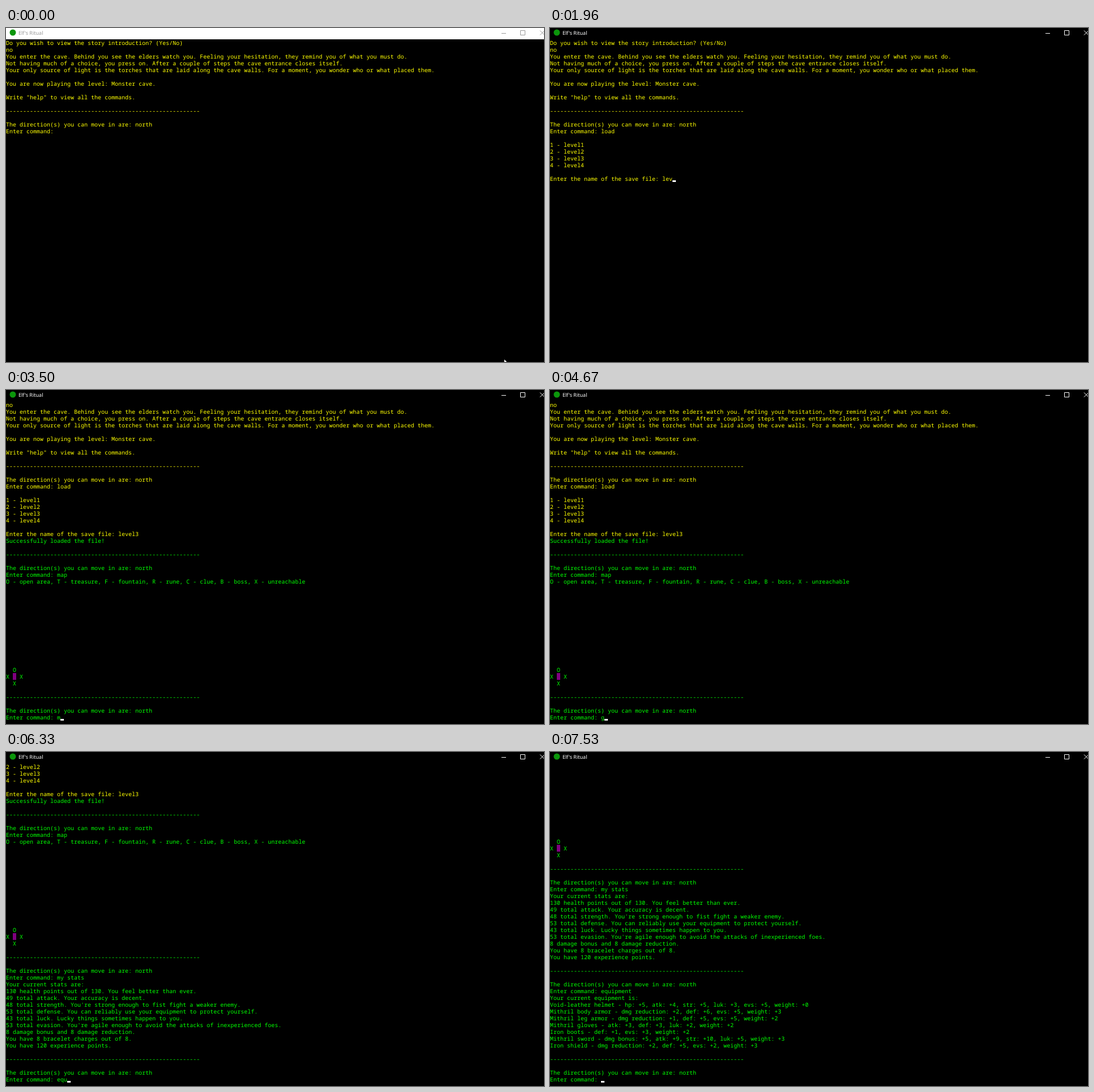
An HTML page that plays this animation: 949x590 px, repeating every 8000 ms.

```html
<!DOCTYPE html>
<html lang="en">
<head>
<meta charset="utf-8">
<title>Elf's Ritual</title>
<style>
  html, body { margin: 0; width: 100%; height: 100%; overflow: hidden; background: #000; }
  svg { display: block; }
  text { white-space: pre; text-rendering: geometricPrecision; }
  #rows { font: 10px "Noto Sans Mono", "DejaVu Sans Mono", monospace; }
  #title { font: 9px "Noto Sans", "Open Sans", sans-serif; }
</style>
</head>
<body>
<svg width="949" height="590" viewBox="0 0 949 590">
  <rect width="949" height="590"/>
  <rect id="bar" width="949" height="20"/>
  <circle cx="12" cy="8" r="5.5" fill="#0b960b"/>
  <text id="title" x="22" y="12">Elf's Ritual</text>
  <path id="buttons" d="M874 9.5h8M907.5 4.5h8v8h-8zM942 4.5l8 8M942 12.5l8 -8" fill="none"/>
  <rect id="marker" x="12" width="6" height="12" fill="#800080"/>
  <g id="rows"></g>
  <rect id="caret" width="6" height="3" fill="#fff"/>
  <path id="pointer" d="M879 585.5v8l6 -2z" fill="#fff"/>
</svg>
<script>
const LOOP = 8000, CELL = 6, ROW = 12, TOP = 20, ROWS = 47;
const YELLOW_LINES = 21, MARKER_LINE = 41;
const el = id => document.getElementById(id);

const prompt = command => ['', '-'.repeat(57), '',
  'The direction(s) you can move in are: north', 'Enter command: ' + command];

const lines = [
  'Do you wish to view the story introduction? (Yes/No)',
  'no',
  'You enter the cave. Behind you see the elders watch you. Feeling your hesitation, they remind you of what you must do.',
  'Not having much of a choice, you press on. After a couple of steps the cave entrance closes itself.',
  'Your only source of light is the torches that are laid along the cave walls. For a moment, you wonder who or what placed them.',
  '',
  'You are now playing the level: Monster cave.',
  '',
  'Write "help" to view all the commands.',
  ...prompt('load'),
  '',
  ...[1, 2, 3, 4].map(n => `${n} - level${n}`),
  '',
  'Enter the name of the save file: level3',
  'Successfully loaded the file!',
  ...prompt('map'),
  'O - open area, T - treasure, F - fountain, R - rune, C - clue, B - boss, X - unreachable',
  ...Array(12).fill(''),
  '  O', 'X   X', '  X',
  ...prompt('my stats'),
  'Your current stats are:',
  '130 health points out of 130. You feel better than ever.',
  '49 total attack. Your accuracy is decent.',
  "48 total strength. You're strong enough to fist fight a weaker enemy.",
  '53 total defense. You can reliably use your equipment to protect yourself.',
  '43 total luck. Lucky things sometimes happen to you.',
  "53 total evasion. You're agile enough to avoid the attacks of inexperienced foes.",
  '8 damage bonus and 8 damage reduction.',
  'You have 8 bracelet charges out of 8.',
  'You have 120 experience points.',
  ...prompt('equipment'),
  'Your current equipment is:',
  'Void-leather helmet - hp: +5, atk: +4, str: +5, luk: +3, evs: +5, weight: +0',
  'Mithril body armor - dmg reduction: +2, def: +6, evs: +5, weight: +3',
  'Mithril leg armor - dmg reduction: +1, def: +5, evs: +5, weight: +2',
  'Mithril gloves - atk: +3, def: +3, luk: +2, weight: +2',
  'Iron boots - def: +1, evs: +3, weight: +2',
  'Mithril sword - dmg bonus: +5, atk: +9, str: +10, luk: +5, weight: +3',
  'Iron shield - dmg reduction: +2, def: +5, evs: +2, weight: +3',
  ...prompt('')
];

// [time, last printed line, typed input (null while printing), caret hidden]
const steps = [
  [0, 13, '', true], [100, 13, ''], [630, 13, '', true],
  [1040, 13, 'l'], [1140, 13, 'lo'], [1200, 13, 'loa'], [1260, 13, 'load'],
  [1390, 18, null], [1450, 20, ''],
  [1780, 20, 'l'], [1850, 20, 'le'], [1920, 20, 'lev'], [1990, 20, 'leve'], [2060, 20, 'level'],
  [2210, 20, 'level3', true],
  [2390, 26, ''], [2940, 26, 'm'], [3090, 26, 'ma'], [3140, 26, 'map'],
  [3220, 47, ''], [3500, 47, 'm'], [3780, 47, 'm', true],
  [4010, 47, 'my'], [4110, 47, 'my '], [4290, 47, 'my ', true], [4520, 47, 'my'],
  [4670, 47, 'g'], [4750, 47, ''], [4880, 47, 'm'], [4960, 47, 'my'], [5050, 47, 'my '],
  [5150, 47, 'my s'], [5250, 47, 'my st'], [5350, 47, 'my sta'], [5440, 47, 'my stat'],
  [5490, 47, 'my stats'],
  [5670, 62, ''], [6150, 62, 'e'], [6240, 62, 'eq'], [6330, 62, 'equ'], [6410, 62, 'equi'],
  [6660, 62, 'equip'], [6840, 62, 'equipm'], [6940, 62, 'equipme'],
  [7050, 62, 'equipmen'], [7150, 62, 'equipment'],
  [7430, 70, null], [7480, 75, '', true], [7530, 75, '']
];

const rows = Array.from({ length: ROWS }, (_, i) => {
  const row = document.createElementNS('http://www.w3.org/2000/svg', 'text');
  row.setAttribute('y', TOP + i * ROW + 10);
  return el('rows').appendChild(row);
});

const grey = v => `rgb(${v},${v},${v})`;
const show = (node, on) => node.setAttribute('visibility', on ? 'visible' : 'hidden');

function drawTitleBar(t) {
  const focus = t < 30 ? 0 : Math.min(1, (Math.floor((t - 30) / 54) + 1) / 6);
  const ink = grey(Math.round(153 + 102 * focus));
  el('bar').setAttribute('fill', grey(Math.round(255 * (1 - focus))));
  el('title').setAttribute('fill', ink);
  el('buttons').setAttribute('stroke', ink);
  show(el('pointer'), t < 30);
}

let shown;
function drawConsole(step) {
  if (step === shown) return;
  shown = step;
  const [, last, typed, hidden] = step;
  const scroll = Math.max(0, last - ROWS + 1);
  const typing = typed !== null;
  const input = typing ? lines[last].slice(0, lines[last].lastIndexOf(': ') + 2) + typed : lines[last];

  rows.forEach((row, i) => {
    const n = i + scroll;
    row.textContent = n < last ? lines[n] : n === last ? input : '';
    row.setAttribute('fill', n < YELLOW_LINES ? '#ff0' : '#0f0');
  });

  el('caret').setAttribute('x', input.length * CELL);
  el('caret').setAttribute('y', TOP + (last - scroll + 1) * ROW - 3);
  show(el('caret'), typing && !hidden);
  el('marker').setAttribute('y', TOP + (MARKER_LINE - scroll) * ROW);
  show(el('marker'), last > MARKER_LINE);
}

function draw(t) {
  drawTitleBar(t);
  drawConsole(steps.filter(s => s[0] <= t).pop());
}

const start = performance.now();
function tick() {
  draw((performance.now() - start) % LOOP);
  requestAnimationFrame(tick);
}
tick();
</script>
</body>
</html>
```
